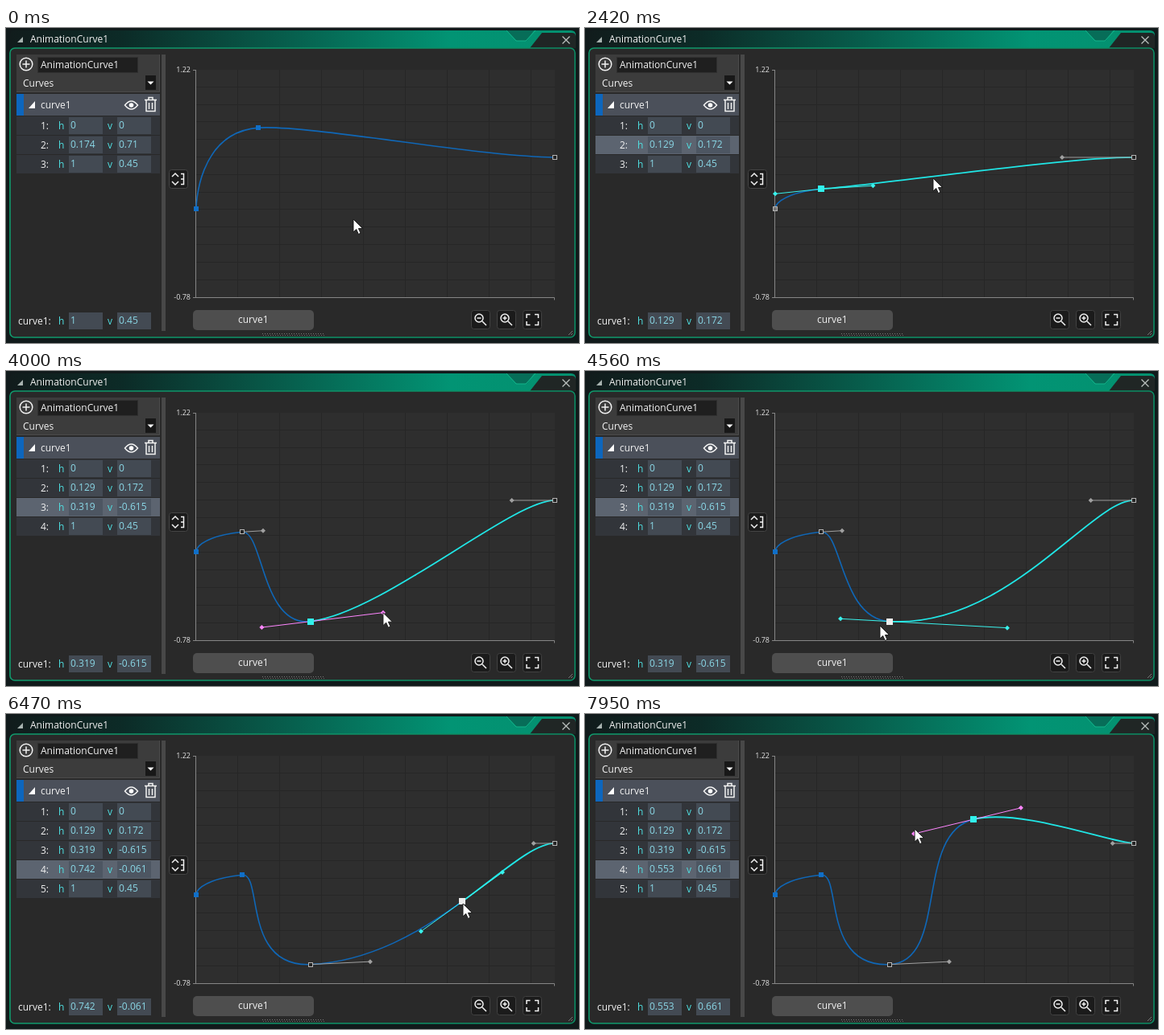
Recreate the animation shown at these times as an HTML page. Size 711 by 392 pixels, loop 8000 ms.

```html
<!DOCTYPE html>
<html lang="en">
<head>
<meta charset="utf-8">
<title>Curve editor</title>
<style>
html, body { margin: 0; width: 100%; height: 100%; overflow: hidden; background: #111a1b; }
svg { display: block; width: 711px; height: 392px; }
text { font: 12px "Open Sans", "Noto Sans", sans-serif; fill: #f2f2f2; white-space: pre; }
.key { fill: #4fe0e2; }
.val { fill: #8ad7e6; }
.axis { font-size: 9px; text-anchor: end; fill: #e4e4e4; }
.icon { fill: none; stroke: #f2f2f2; stroke-width: 1.5; }
</style>
</head>
<body>
<svg viewBox="0 0 711 392">
  <defs>
    <linearGradient id="bar">
      <stop offset="0" stop-color="#111c1c"/><stop offset=".2" stop-color="#0c2b27"/>
      <stop offset=".5" stop-color="#07604e"/><stop offset=".78" stop-color="#029474"/>
      <stop offset="1" stop-color="#04906f"/>
    </linearGradient>
    <linearGradient id="edge">
      <stop offset="0" stop-color="#109a6c"/><stop offset="1" stop-color="#0b8c63"/>
    </linearGradient>
  </defs>
  <g id="frame"></g>
  <g id="rows"></g>
  <g id="plot"></g>
</svg>
<script>
const LOOP = 8000;
const CYAN = '#20e6e6', BLUE = '#0f67b7', GREY = '#a0a0a0', PINK = '#ff86ff';
const LEFT = 236, TOP = 52, WIDTH = 445, HEIGHT = 283, UNIT = HEIGHT / 2;
const $ = id => document.getElementById(id);

const rect = (x, y, w, h, fill, extra = '') =>
  `<rect x="${x}" y="${y}" width="${w}" height="${h}" fill="${fill}" ${extra}/>`;
const path = (d, attrs = 'class="icon"') => `<path d="${d}" ${attrs}/>`;
const text = (x, y, s, cls = '') => `<text x="${x}" y="${y}" class="${cls}">${s}</text>`;
const range = n => [...Array(n).keys()];

const toPx = ([h, v]) => [LEFT + WIDTH * h, TOP + (1.22 - v) * UNIT];
const fromPx = ([x, y]) => [(x - LEFT) / WIDTH, 1.22 - (y - TOP) / UNIT];
const add = (a, b) => [a[0] + b[0], a[1] + b[1]];
const sub = (a, b) => [a[0] - b[0], a[1] - b[1]];
const mix = (a, b, k) => [a[0] + (b[0] - a[0]) * k, a[1] + (b[1] - a[1]) * k];
// A tangent opposite to the given one, with its own length
const opposite = (v, length) => v.map(c => -c * length / Math.hypot(...v));

// Eased position on a list of [time, x, y]
function track(t, keys) {
  const i = keys.findIndex(k => k[0] > t);
  if (i === 0) return keys[0].slice(1);
  if (i < 0) return keys[keys.length - 1].slice(1);
  const a = keys[i - 1], b = keys[i];
  const k = (t - a[0]) / (b[0] - a[0]);
  return mix(a.slice(1), b.slice(1), k * k * (3 - 2 * k));
}

const SELECT = 890, ADD_THIRD = 2460, ADD_FOURTH = 6330;
const SECOND = [[890, .174, .71], [1160, .181, .399], [1470, .129, .172]];
const THIRD = [[2650, .44, .276], [3160, .324, -.572], [3430, .319, -.615]];
const FOURTH = [[6510, .742, -.061], [6930, .609, .498], [7280, .553, .661]];
const THIRD_OUT = [[4000, 90, -11], [4260, 146, 8]];
const THIRD_IN = [[4820, -61, -3], [5280, -85, 4]];
const FOURTH_IN = [[7600, -51, 37], [7800, -83, 25], [7950, -74, 18]];
const CURSOR = [
  [50, 431, 238], [640, 303, 120], [830, 311, 123], [880, 311, 123],
  [1490, 291, 199], [1820, 291, 199], [2400, 432, 187], [2650, 432, 187],
  [3490, 379, 315], [3620, 430, 280], [3750, 468, 301], [4000, 468, 301],
  [4300, 524, 320], [4560, 366, 317], [4770, 318, 309], [4820, 318, 309],
  [5330, 293, 316], [5590, 261, 315], [5670, 265, 314], [6240, 567, 236],
  [6510, 567, 236], [7340, 483, 137], [7550, 432, 165], [7600, 432, 165]
];

// Splits the segment after point i, keeping its shape
function split(points, i, k) {
  const a = points[i], b = points[i + 1];
  const p1 = add(a.at, a.out), p2 = add(b.at, b.in);
  const q1 = mix(a.at, p1, k), q2 = mix(p1, p2, k), q3 = mix(p2, b.at, k);
  const r1 = mix(q1, q2, k), r2 = mix(q2, q3, k), at = mix(r1, r2, k);
  a.out = sub(q1, a.at);
  b.in = sub(q3, b.at);
  points.splice(i + 1, 0, { at, in: sub(r1, at), out: sub(r2, at) });
  return points[i + 1];
}

function curveAt(t) {
  const second = toPx(track(t, SECOND));
  const points = [
    { at: toPx([0, 0]), in: [0, 0], out: [0, 0] },
    { at: second, in: [Math.max(-77, LEFT - second[0]), 6], out: [64, -4] },
    { at: toPx([1, .45]), in: [-89, 0], out: [0, 0] }
  ];
  if (t >= ADD_THIRD) {
    const p = split(points, 1, .4);
    p.at = toPx(track(t, THIRD));
    if (t >= 4000) {
      p.out = track(t, THIRD_OUT);
      p.in = opposite(p.out, 61);
    }
    if (t >= 4820) {
      p.in = track(t, THIRD_IN);
      p.out = opposite(p.in, 146);
    }
  }
  if (t >= ADD_FOURTH) {
    const p = split(points, 2, .507);
    p.at = toPx(track(t, FOURTH));
    if (t >= 7600) {
      p.in = track(t, FOURTH_IN);
      p.out = opposite(p.in, 60.5);
    }
  }
  return points;
}

function cursorAt(t, points) {
  if (t >= 890 && t < 1490) return add(points[1].at, [-2, -1]);
  if (t >= 2650 && t < 3490) return add(points[2].at, [1, 3]);
  if (t >= 4000 && t < 4280) return add(points[2].at, points[2].out);
  if (t >= 4820 && t < 5330) return add(points[2].at, points[2].in);
  if (t >= 6510 && t < 7340) return add(points[3].at, [0, 6]);
  if (t >= 7600) return add(add(points[3].at, points[3].in), [1, -6]);
  return track(t, CURSOR);
}

const number = n => String(+n.toFixed(3) || 0);

function fields(y, at, cellFill) {
  const [h, v] = fromPx(at).map(number);
  return rect(78, y, 42, 21, cellFill) + rect(138, y, 42, 21, cellFill) +
    text(65, y + 15, 'h', 'key') + text(80, y + 14, h, 'val') +
    text(126, y + 15, 'v', 'key') + text(140, y + 14, v, 'val');
}

function drawRows(points, selected) {
  const rows = points.map((p, i) => {
    const y = 110 + 24 * i, on = i === selected;
    return rect(13, y, 178, 23, on ? '#5c6470' : '#32353a') +
      fields(y + 1, p.at, on ? '#4d5662' : '#434a53') + text(43, y + 16, `${i + 1}:`);
  });
  const shown = points[selected] || points[points.length - 1];
  return rows.join('') + text(15, 369, 'curve1:') + fields(354, shown.at, '#434a53');
}

function handle(p, side, color) {
  const [x, y] = add(p.at, p[side]);
  return path(`M${p.at}L${x},${y}`, `stroke="${color}" fill="none"`) +
    path(`M${x - 3},${y}l3-3l3 3l-3 3z`, `fill="${color}"`);
}

function marker([x, y], size, fill, stroke = 'none') {
  const left = Math.round(x - size / 2), top = Math.round(y - size / 2);
  return stroke === 'none' ? rect(left, top, size, size, fill)
    : rect(left + .5, top + .5, size - 1, size - 1, fill, `stroke="${stroke}"`);
}

function drawPlot(t, points, selected) {
  const cursor = cursorAt(t, points);
  const dragging = (t >= 2650 && t < 3470) || (t >= 6510 && t < 7320);
  const pulling = (t >= 3750 && t < 4290) || (t >= 4800 && t < 5320) || t >= 7580;
  const active = selected < 0 ? 1 : selected;
  const near = Math.hypot(...sub(cursor, points[active].at)) < 15 && !dragging;
  const last = points.length - 1;
  let out = '';

  points.slice(0, -1).forEach((p, i) => {
    const q = points[i + 1], on = i === selected;
    out += path(`M${p.at}C${add(p.at, p.out)} ${add(q.at, q.in)} ${q.at}`,
      `fill="none" stroke="${on ? CYAN : BLUE}" stroke-width="${on ? 1.8 : 1.6}"`);
  });
  if (selected > 0) {
    const color = pulling ? PINK : '#39f2ec';
    out += handle(points[selected - 1], 'out', GREY) + handle(points[selected + 1], 'in', GREY) +
      handle(points[selected], 'in', color) + handle(points[selected], 'out', color);
  }
  points.forEach((p, i) => {
    const neighbour = selected > 0 && Math.abs(i - selected) === 1;
    if (i === active && near) out += marker(p.at, 8, '#ededed');
    else if (i === selected) out += marker(p.at, 8, '#31f1ec');
    else if (i === last || neighbour)
      out += marker(p.at, 6, i === 0 ? '#777' : '#242424', '#b4b4b4');
    else out += marker(p.at, 6, '#106fc8');
  });
  return out + `<g transform="translate(${cursor})">` +
    path('M0 0V16L3.7 12.5L6.4 18.5L9 17.3L6.4 11.5H11.5Z',
      'fill="#fff" stroke="#161616" stroke-width=".9"') + '</g>';
}

function drawFrame() {
  const button = x => rect(x + .5, 351.5, 23, 23, '#1b1b1b', 'rx="3" stroke="#414141"');
  const lens = x => `<circle cx="${x}" cy="361" r="5" class="icon"/>` +
    path(`M${x + 4} 365l5 5`) + path(`M${x - 2.5} 361h5`);
  const columns = range(8).map(i => `M${288 + 52 * i - .5} ${TOP}v${HEIGHT}`).join('');
  const lines = range(12).map(i =>
    `M${LEFT} ${Math.round(TOP + 21.8 * (i + 1)) - .5}h${WIDTH}`).join('');
  const dots = range(26).map(i =>
    rect(318 + 3 * i, 380, 1, 1, '#777') + rect(319 + 3 * i, 382, 1, 1, '#666')).join('');

  return rect(0, 0, 711, 392, '#111a1b') +
    path('M5 25V9Q5 3 11 3H701Q707 3 707 9V25Z', 'fill="url(#bar)"') +
    path('M621 3H655L646 16H634Z', 'fill="#076d58"') +
    path('M621 3L633 16H645L657 3', 'fill="none" stroke="#13b58b"') +
    path('M650 25L665 6H702Q707 6 707 11V25Z', 'fill="#202625"') +
    path('M690.5 10.5l9 9m0-9l-9 9', 'stroke="#b9bfbd" stroke-width="1.3"') +
    path('M21 11V18H14Z', 'fill="#a8b3b0"') + text(30, 18, 'AnimationCurve1') +
    rect(5, 25, 701, 360, '#292929', 'rx="6" stroke="url(#edge)" stroke-width="1.6"') +

    rect(13, 33, 178, 47, '#3c3c3c') + path('M13 79.5H190.5V33', 'fill="none" stroke="#4b4b4b"') +
    '<circle cx="25" cy="45" r="7.8" class="icon"/>' + path('M20.5 45h9M25 40.5v9') +
    rect(39.5, 36.5, 124, 19, '#1f1f1f', 'stroke="#303030"') + text(43, 50, 'AnimationCurve1') +
    text(21, 73, 'Curves') + rect(173, 59, 13, 18, '#181818') +
    path('M175.5 66.5h8l-4 4z', 'fill="#fff"') +
    rect(13, 82, 178, 27, '#4b505a') + rect(13, 82, 9, 27, '#0d66bd') +
    path('M36 91V100H28Z', 'fill="#fff"') + text(43, 100, 'curve1') +
    path('M147.5 96Q155.5 86 163.5 96Q155.5 106 147.5 96Z') +
    '<circle cx="155.5" cy="96" r="2.8" fill="#fff"/>' +
    path('M172 89.5h15M177 89v-2.5h5V89M174 90v13.5h11V90M177.5 93v8M181.5 93v8') +
    rect(193, 33, 5, 344, '#484848') +

    rect(LEFT, TOP, WIDTH, HEIGHT, '#2e2e2e') +
    path(columns + lines, 'stroke="#262626" fill="none"') +
    path('M232 52.5h4M235.5 52V335.5H680.5v3M232 335.5h4', 'fill="none" stroke="#858585"') +
    text(229, 55, '1.22', 'axis') + text(229, 338, '-0.78', 'axis') +
    rect(202.5, 176.5, 23, 23, '#1b1b1b', 'rx="3" stroke="#454545"') +
    path('M206 185l4-4l4 4M206 191l4 4l4-4M217 181.5h3.5v13H217M217 188h3') +
    rect(232, 351, 150, 25, '#4e4e4e', 'rx="5"') + text(288, 367, 'curve1') +
    button(577) + button(609) + button(641) + lens(587) + lens(619) + path('M619 358.5v5') +
    path('M646 361v-4.5h4.5M656 356.5h4.5v4.5M660.5 365v4.5H656M650.5 369.5H646V365') +
    dots + path('M698 382l5-5M701 382l2-2', 'stroke="#777"');
}

$('frame').innerHTML = drawFrame();

function render() {
  const t = performance.now() % LOOP;
  const points = curveAt(t);
  const selected = t < SELECT ? -1 : t < ADD_THIRD ? 1 : t < ADD_FOURTH ? 2 : 3;
  $('rows').innerHTML = drawRows(points, selected);
  $('plot').innerHTML = drawPlot(t, points, selected);
  requestAnimationFrame(render);
}
render();
</script>
</body>
</html>
```
